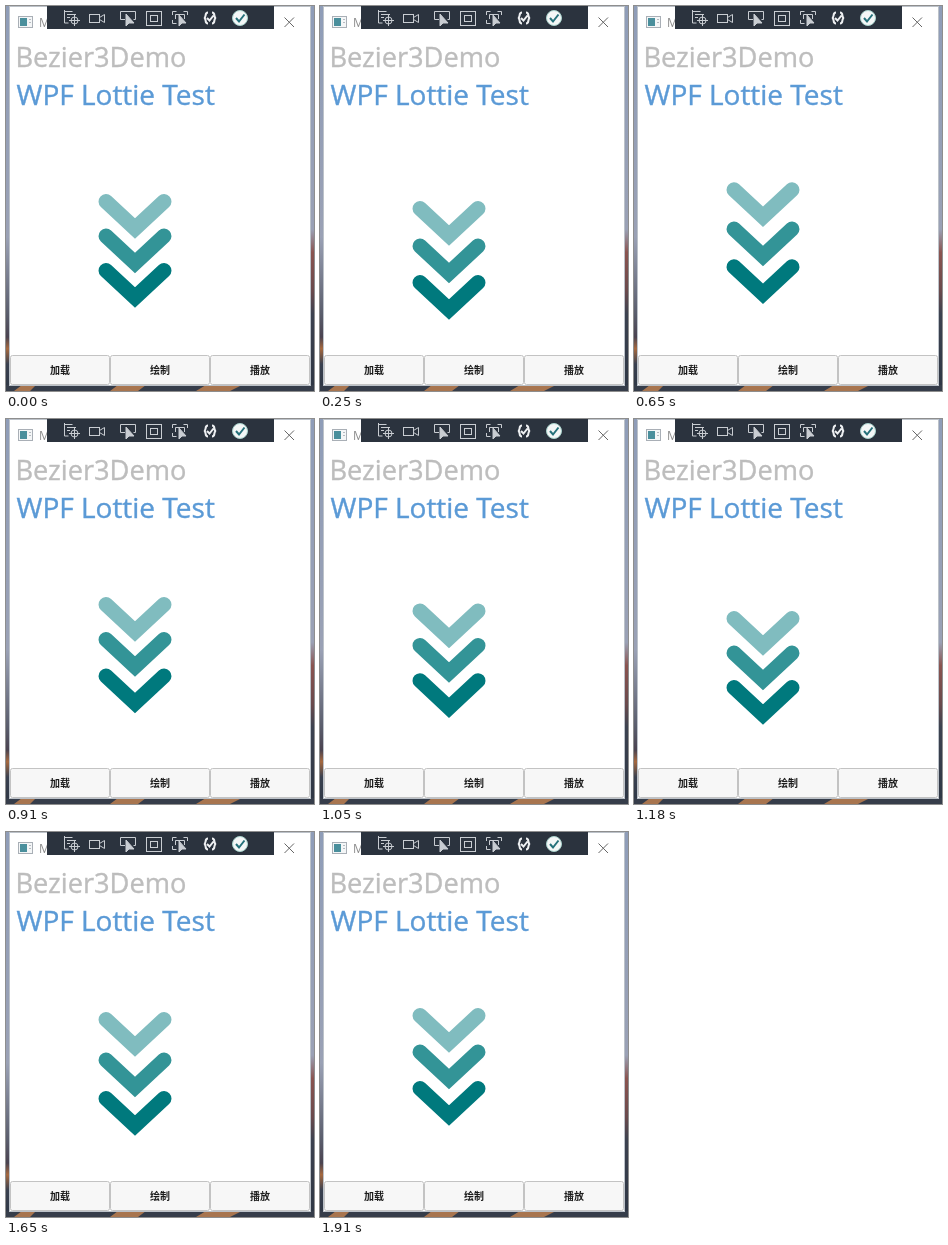
These frames come from a looping animation (308x385 px, 1.98 s). An HTML page:

```html
<!DOCTYPE html>
<html lang="zh">
<head>
<meta charset="utf-8">
<style>
html, body { margin: 0; width: 100%; height: 100%; overflow: hidden; }
svg { display: block; width: 308px; height: 385px; }
text { font-family: "Open Sans", "Noto Sans", sans-serif; }
.head { stroke-width: .4; }
.label { font: bold 10px "Noto Sans CJK SC", "Noto Sans CJK", sans-serif; text-anchor: middle; fill: #1c1c1c; }
.line { fill: none; stroke: #c9cdd2; stroke-width: 1; }
#arrows path { fill: none; stroke-width: 15; stroke-linecap: round; }
</style>
</head>
<body>
<svg viewBox="0 0 308 385">
  <defs>
    <linearGradient id="left" x2="0" y2="1">
      <stop offset="0" stop-color="#8f9db8"/>
      <stop offset=".6" stop-color="#9aa1b5"/>
      <stop offset=".8" stop-color="#5a5d6c"/>
      <stop offset=".86" stop-color="#4a4350"/>
      <stop offset=".89" stop-color="#a5683f"/>
      <stop offset=".93" stop-color="#3a4150"/>
      <stop offset="1" stop-color="#2e3644"/>
    </linearGradient>
    <linearGradient id="right" x2="0" y2="1">
      <stop offset="0" stop-color="#8f9db8"/>
      <stop offset=".58" stop-color="#9aa1b5"/>
      <stop offset=".64" stop-color="#8a5450"/>
      <stop offset=".74" stop-color="#6a4a4c"/>
      <stop offset=".8" stop-color="#3c4250"/>
      <stop offset="1" stop-color="#2e3644"/>
    </linearGradient>
  </defs>

  <!-- desktop around the window -->
  <rect width="154" height="385" fill="url(#left)"/>
  <rect x="154" width="154" height="385" fill="url(#right)"/>
  <rect y="379" width="308" height="6" fill="#363d4a"/>
  <path d="M8 385l8-6h14l-6 6zM104 385l8-6h28l-8 6zM190 385l10-6h36l-12 6z" fill="#a8754f"/>

  <rect x="3.5" y=".5" width="301" height="379" fill="#fff" stroke="#bcc2c9"/>

  <!-- title bar -->
  <rect x="12.5" y="10.5" width="14" height="11" fill="#f4f6f7" stroke="#a9afb6"/>
  <rect x="14" y="12" width="7" height="8" fill="#4a8f9c"/>
  <path d="M23 13.500h2M23 16.500h2" stroke="#b5bac0"/>
  <text x="33" y="21" font-size="12" fill="#8c8c8c">M</text>
  <path d="M278.500 11.500l9.500 9.500m0-9.500l-9.500 9.500" stroke="#666" fill="none"/>

  <!-- debug toolbar -->
  <rect x="41" width="227" height="23" fill="#2b333e"/>
  <g class="line">
    <path d="M58.500 4v13h4M58.500 5.500h8M61 8.500h9M61 11.500h3"/>
    <circle cx="68.500" cy="14.500" r="3.500"/><path d="M68.500 9v11M63 14.500h11"/>
    <rect x="83.500" y="8.500" width="10" height="8"/><path d="M93.500 11.500l5-3v8l-5-3"/>
    <path d="M119 13.500h-4.500v-8h15v8h-2"/><path d="M120 8v12l3-3 5 0z" fill="#c9cdd2"/>
    <rect x="140.500" y="5.500" width="15" height="14"/><rect x="144.500" y="9.500" width="7" height="6"/>
    <path d="M166.500 9V5.500h4m7 0h4V9m-15 5v3.500h4M169.500 13V8.500h9V13"/>
    <path d="M173 9v11l3-3 4 0z" fill="#c9cdd2"/>
    <path stroke="#eef0f2" stroke-width="2" d="M202 6.500c-4 0-1 5-4 5.500 3 .5 0 5.500 4 5.500M206 6.500c4 0 1 5 4 5.500-3 .5 0 5.500-4 5.500M201 12l2.500 2.500 4-5"/>
  </g>
  <circle cx="234" cy="12" r="7.500" fill="#f4f7f7" stroke="#a9d3cd"/>
  <path d="M230 12l3 3.500 5.500-7" fill="none" stroke="#25717a" stroke-width="2"/>

  <text class="head" x="9.500" y="61" font-size="27.2" fill="#bdbdbd" stroke="#bdbdbd">Bezier3Demo</text>
  <text class="head" x="10.500" y="99" font-size="28" fill="#5b9ad6" stroke="#5b9ad6">WPF Lottie Test</text>

  <g id="arrows">
    <path stroke="#80bcbf" d="M100 7.500l29 27 29-27"/>
    <path stroke="#339497" d="M100 7.500l29 27 29-27"/>
    <path stroke="#00797d" d="M100 7.500l29 27 29-27"/>
  </g>

  <g fill="#f7f7f7" stroke="#c3c3c3">
    <rect x="4.500" y="349.500" width="99" height="29" rx="2"/>
    <rect x="104.500" y="349.500" width="99" height="29" rx="2"/>
    <rect x="204.500" y="349.500" width="99" height="29" rx="2"/>
  </g>
  <text class="label" x="54" y="368">加载</text>
  <text class="label" x="154" y="368">绘制</text>
  <text class="label" x="254" y="368">播放</text>
</svg>
<script>
const LOOP = 1980, STEP = 66, LEAD = 16, STEPS = 30, CYCLE = 17;
// Top edge of each arrow at the key steps of one bounce.
const keys = [0, 1, 4, 7, 8, 9, 12, 14];
const tops = [
  [188, 192, 195, 184, 180, 177, 176, 178],
  [222.5, 226.5, 232.5, 223.5, 220.5, 217.5, 212.5, 213],
  [257, 261, 269, 262, 259, 256, 249, 249.5],
];
const arrows = document.querySelectorAll('#arrows path');

// Smooth periodic curve through the key values.
function curve(values, s) {
  const n = keys.length;
  const x = i => keys[(i + n) % n] + CYCLE * Math.floor(i / n);
  const y = i => values[(i + n) % n];
  const slope = i => (y(i + 1) - y(i - 1)) / (x(i + 1) - x(i - 1));
  const i = keys.findLastIndex(k => k <= s);
  const h = x(i + 1) - x(i), u = (s - x(i)) / h, v = 1 - u;
  return y(i) * v * v * (1 + 2 * u) + y(i + 1) * u * u * (3 - 2 * u)
    + h * u * v * (slope(i) * v - slope(i + 1) * u);
}

function draw() {
  const t = performance.now() % LOOP;
  const step = Math.min(STEPS - 1, Math.floor((t + LEAD) / STEP));
  arrows.forEach((arrow, i) =>
    arrow.setAttribute('transform', `translate(0 ${curve(tops[i], step % CYCLE).toFixed(2)})`));
  requestAnimationFrame(draw);
}
draw();
</script>
</body>
</html>
```
